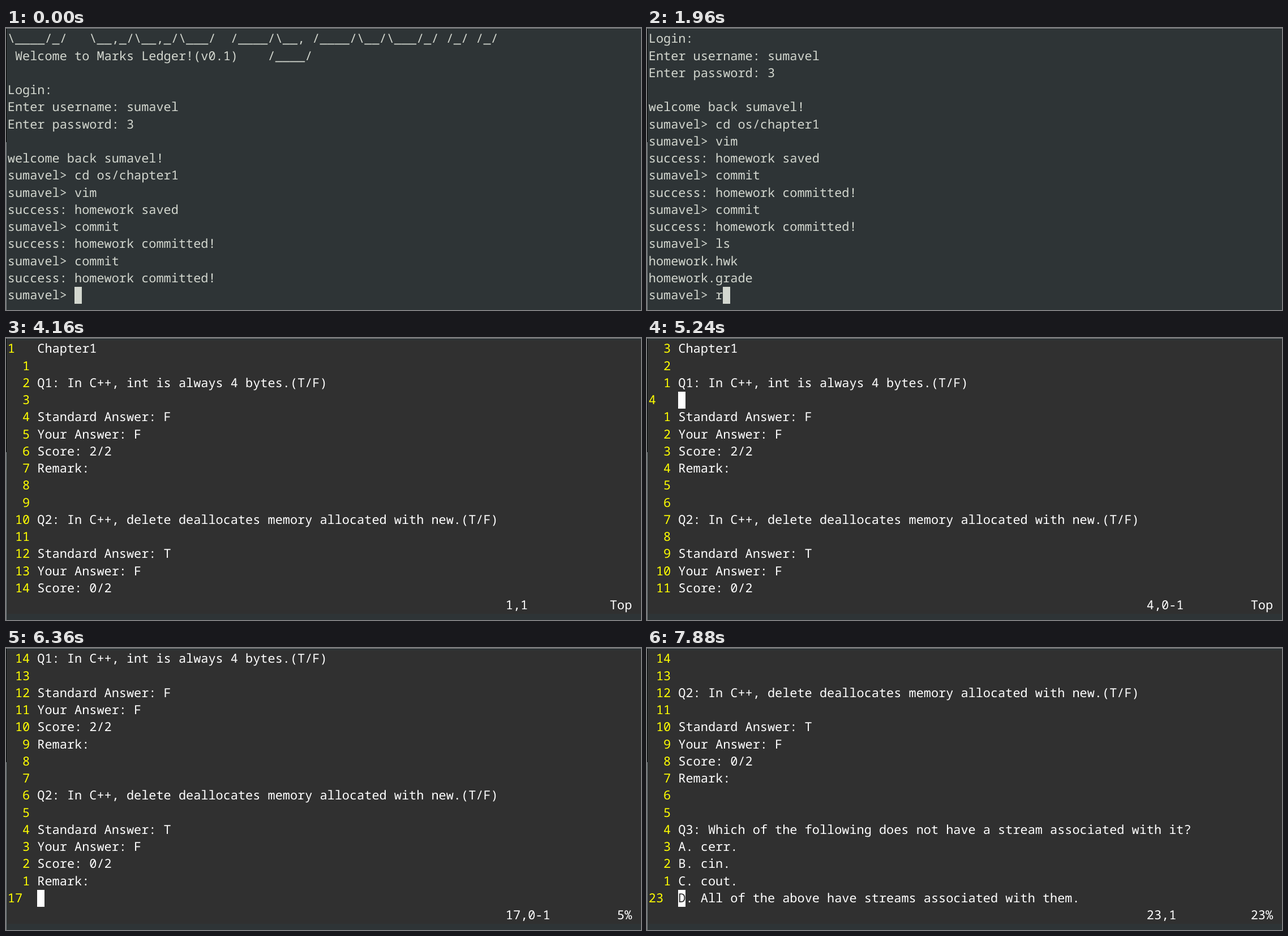
Write an HTML page that moves like this. It is 1122 px wide and 499 px high and loops after 8000 ms.

```html
<!DOCTYPE html>
<html lang="en">
<head>
<meta charset="utf-8">
<title>Terminal session</title>
<style>
  html, body { margin: 0; width: 100%; height: 100%; overflow: hidden; background: #2e3436; }
  #stage {
    position: relative; width: 1122px; height: 499px; overflow: hidden;
    background: #2e3436; color: #d3d7cf;
    font: 21.9px/30.25px "Noto Sans Mono", monospace;
    text-rendering: geometricPrecision; font-kerning: none; font-variant-ligatures: none;
  }
  #stage div { position: absolute; }
  #panel { left: 2px; top: 4px; width: 1120px; height: 484px; background: #303030; visibility: hidden; }
  #top { left: 0; top: 0; width: 1122px; height: 2px; background: linear-gradient(#85888a 1px, #262b2d 1px); }
  #left { left: 0; top: 1px; width: 1px; height: 498px; background: linear-gradient(#000 201px, #7d8486 201px); }
  #cursor { width: 13.14px; height: 30.25px; background: currentColor; }
  .row { left: 2.8px; height: 30.25px; padding-top: .25px; white-space: pre; }
  .row b { font-weight: inherit; color: #ff0; }
  .row i { font-style: inherit; color: #303030; }
  .editor { color: #fff !important; }
  .editor #panel { visibility: visible; }
</style>
</head>
<body>
<div id="stage">
  <div id="panel"></div>
  <div id="top"></div>
  <div id="left"></div>
  <div id="cursor"></div>
</div>
<script>
const LOOP = 8000, ROWS = 16, CELL_W = 13.14, CELL_H = 30.25, LEFT = 2.8, TOP = 4;
const USER = 'sumavel', PROMPT = USER + '> ';

const session = [
  String.raw`\____/_/   \__,_/\__,_/\___/  /____/\__, /____/\__/\___/_/ /_/ /_/`,
  ' Welcome to Marks Ledger!(v0.1)    /____/',
  '',
  'Login:',
  'Enter username: ' + USER,
  'Enter password: 3',
  '',
  `welcome back ${USER}!`,
  PROMPT + 'cd os/chapter1',
  PROMPT + 'vim',
  'success: homework saved',
  PROMPT + 'commit',
  'success: homework committed!',
  PROMPT + 'commit',
  'success: homework committed!'
];
const listing = [PROMPT + 'ls', 'homework.hwk', 'homework.grade'];

const answers = (right, score) =>
  ['', 'Standard Answer: ' + right, 'Your Answer: F', `Score: ${score}/2`, 'Remark:', '', ''];
const review = [
  'Chapter1', '',
  'Q1: In C++, int is always 4 bytes.(T/F)', ...answers('F', 2),
  'Q2: In C++, delete deallocates memory allocated with new.(T/F)', ...answers('T', 0),
  'Q3: Which of the following does not have a stream associated with it?',
  'A. cerr.', 'B. cin.', 'C. cout.',
  'D. All of the above have streams associated with them.'
];
const PAGE = 15, SCROLL_RANGE = 34;

// [time, value] steps
const typing = [[0, ''], [500, 'l'], [580, 'ls'], [840, ''], [1960, 'r'], [2110, 're'],
  [2310, 'rev'], [2440, 'revi'], [2580, 'revie'], [2640, 'review']];
const moves = [[3650, 1], [4840, 2], [5100, 3], [5240, 4], [5770, 6], [5850, 8], [5930, 10],
  [6010, 12], [6080, 14], [6160, 16], [6360, 17], [6480, 18], [6680, 19], [6880, 20],
  [7080, 21], [7220, 22], [7880, 23]];
const hidden = [[1430, 1960], [3240, 3500], [4160, 4770], [7810, 7880]];
const LISTED = 840, ENTERED = 3500, CLEARED = 3570, OPENED = 3650;

const at = (steps, t) => steps.filter(s => s[0] <= t).pop()[1];
const isShown = t => !hidden.some(([from, to]) => t >= from && t < to);

function shell(t) {
  const lines = t < LISTED ? [...session] : [...session, ...listing];
  lines.push(PROMPT + at(typing, t));
  if (t >= ENTERED) lines.push('');
  const rows = lines.slice(-ROWS);
  return { rows, x: rows[ROWS - 1].length, y: ROWS - 1 };
}

function editor(t) {
  if (t < OPENED) return { rows: [], x: 0, y: 0, editor: true };
  const line = at(moves, t), above = Math.max(0, line - PAGE);
  const rows = review.slice(above, above + PAGE).map((text, i) => {
    const n = above + i + 1;
    if (n !== line) return `<b>${String(Math.abs(n - line)).padStart(3)}</b> ${text}`;
    const shown = text && isShown(t) ? `<i>${text[0]}</i>${text.slice(1)}` : text;
    return `<b>${String(n).padEnd(3)}</b> ${shown}`;
  });
  const place = line + (review[line - 1] ? ',1' : ',0-1');
  const part = above ? Math.floor(above * 100 / SCROLL_RANGE) + '%' : 'Top';
  rows.push(' '.repeat(67) + place.padEnd(14) + part.padStart(3));
  return { rows, x: 4, y: line - above - 1, editor: true };
}

const stage = document.getElementById('stage');
const cursor = document.getElementById('cursor');
const rowEls = Array.from({ length: ROWS }, (_, i) => {
  const el = document.createElement('div');
  el.className = 'row';
  el.style.top = TOP + i * CELL_H + 'px';
  return stage.appendChild(el);
});

let last = '';
function draw(t) {
  const view = t < CLEARED ? shell(t) : editor(t);
  const key = JSON.stringify([view, isShown(t)]);
  if (key === last) return;
  last = key;
  stage.classList.toggle('editor', !!view.editor);
  rowEls.forEach((el, i) => {
    const text = view.rows[i] || '';
    if (view.editor) el.innerHTML = text;
    else el.textContent = text;
  });
  cursor.style.left = LEFT + view.x * CELL_W + 'px';
  cursor.style.top = TOP + view.y * CELL_H + 'px';
  cursor.style.visibility = isShown(t) ? 'visible' : 'hidden';
}

const start = performance.now();
function tick() {
  draw((performance.now() - start) % LOOP);
  requestAnimationFrame(tick);
}
tick();
</script>
</body>
</html>
```
